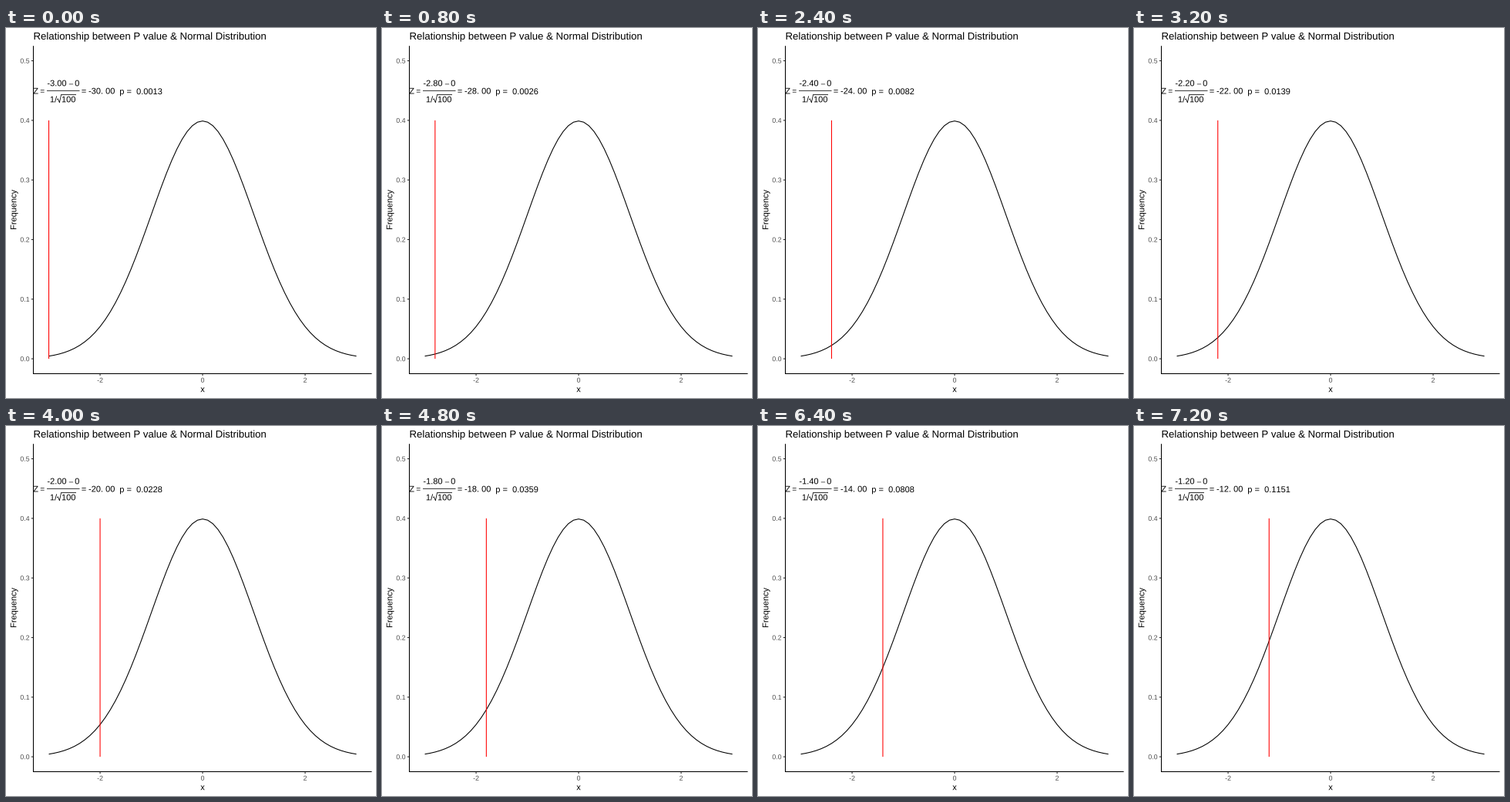
Animation, 480 px wide and 480 px high, one loop 8 s. Source, as a matplotlib script:

```python
import math

import numpy as np
import matplotlib.pyplot as plt
from matplotlib.animation import FuncAnimation
from matplotlib.patches import PathPatch
from matplotlib.textpath import TextPath
from matplotlib.transforms import Affine2D

SIZE, DPI = 480, 80
PT = 72 / DPI  # points per pixel
FRAMES, INTERVAL = 10, 800
LEFT, RIGHT, TOP, BOTTOM = 35.5, 474.5, 23.2, 448.45
BODY = 11.04

plt.rcParams["font.family"] = "Liberation Sans"
plt.rcParams["text.kerning_factor"] = 12  # plain advances, no pair kerning

fig = plt.figure(figsize=(SIZE / DPI, SIZE / DPI), dpi=DPI, facecolor="white")
ax = fig.add_axes([0, 0, 1, 1])
ax.set_xlim(0, SIZE)
ax.set_ylim(SIZE, 0)
ax.axis("off")


def px(x):
    return 255.05 + 66.5 * x


def py(y):
    return 429.1 - 773.2 * y


def line(xs, ys, color="black", width=1.07, cap="butt"):
    return ax.plot(xs, ys, color=color, lw=width * PT, snap=False,
                   solid_capstyle=cap, solid_joinstyle="round")[0]


class Label:
    """Text as outlines, so that it sits at exact subpixel positions."""

    def __init__(self, x, y, s, size=BODY, color="black", angle=0):
        self.size = size
        place = Affine2D().scale(1, -1).rotate_deg(-angle).translate(x, y)
        self.patch = PathPatch(self.outline(s), fc=color, lw=0, snap=False,
                               transform=place + ax.transData)
        ax.add_artist(self.patch)

    def outline(self, s):
        return TextPath((0, 0), s, size=self.size)

    def set(self, s):
        self.patch.set_path(self.outline(s))


def p_value(z):
    return 0.5 * (1 + math.erf(z / math.sqrt(2)))


# Axes, ticks and titles
line([LEFT, LEFT], [TOP, BOTTOM + 0.5])
line([LEFT - 0.5, RIGHT], [BOTTOM, BOTTOM])
for i in range(6):
    y = py(i / 10)
    line([LEFT - 2.75, LEFT - 0.5], [y, y], "#333333")
    Label(18.35, y + 3.15, f"{i / 10:.1f}", 8.8, "#4d4d4d")
for v, half in ((-2, 3.9), (0, 2.45), (2, 2.45)):
    line([px(v)] * 2, [BOTTOM + 0.5, BOTTOM + 2.75], "#333333")
    Label(px(v) - half, 459.8, str(v), 8.8, "#4d4d4d")
Label(LEFT, 14.95, "Relationship between P value & Normal Distribution", 13.2)
Label(252.3, 472.2, "x", 11)
Label(13.35, 261.8, "Frequency", 11, angle=90)

# Normal density
xs = np.linspace(-3, 3, 61)
line(px(xs), py(np.exp(-xs**2 / 2) / math.sqrt(2 * math.pi)))

# Fixed parts of the formula
Label(35.3, 85.4, "Z")
Label(44.3, 85.2, "=", 10)
Label(81.8, 75.3, "\u2013", 9.5)
Label(89.2, 75.3, "0")
line([53, 95.5], [81.3, 81.3], width=0.8)
Label(56.9, 96.3, "1/")
line([66.2, 67.4, 69.4, 71.6, 91], [92.8, 91.8, 96.8, 86.4, 86.4], width=0.8)
Label(72, 96.3, "100")
Label(97.8, 85.4, "=")

# Moving parts
mean_label = Label(53.4, 75.3, "-3.00")
z_label = Label(107, 85.4, "-30. 00")
p_label = Label(147.3, 86, "p =  0.0013")
marker = line([px(-3)] * 2, [py(0.4), py(0)], "#ff0000")


def update(i):
    mean = -3 + 0.2 * i
    mean_label.set(f"{mean:.2f}")
    z_label.set(f"{mean * 10:.0f}. 00")
    p_label.set(f"p =  {p_value(mean):.4f}")
    marker.set_xdata([px(mean)] * 2)
    return mean_label.patch, z_label.patch, p_label.patch, marker


anim = FuncAnimation(fig, update, frames=FRAMES, interval=INTERVAL,
                     repeat=True, repeat_delay=0)
plt.show()
```
